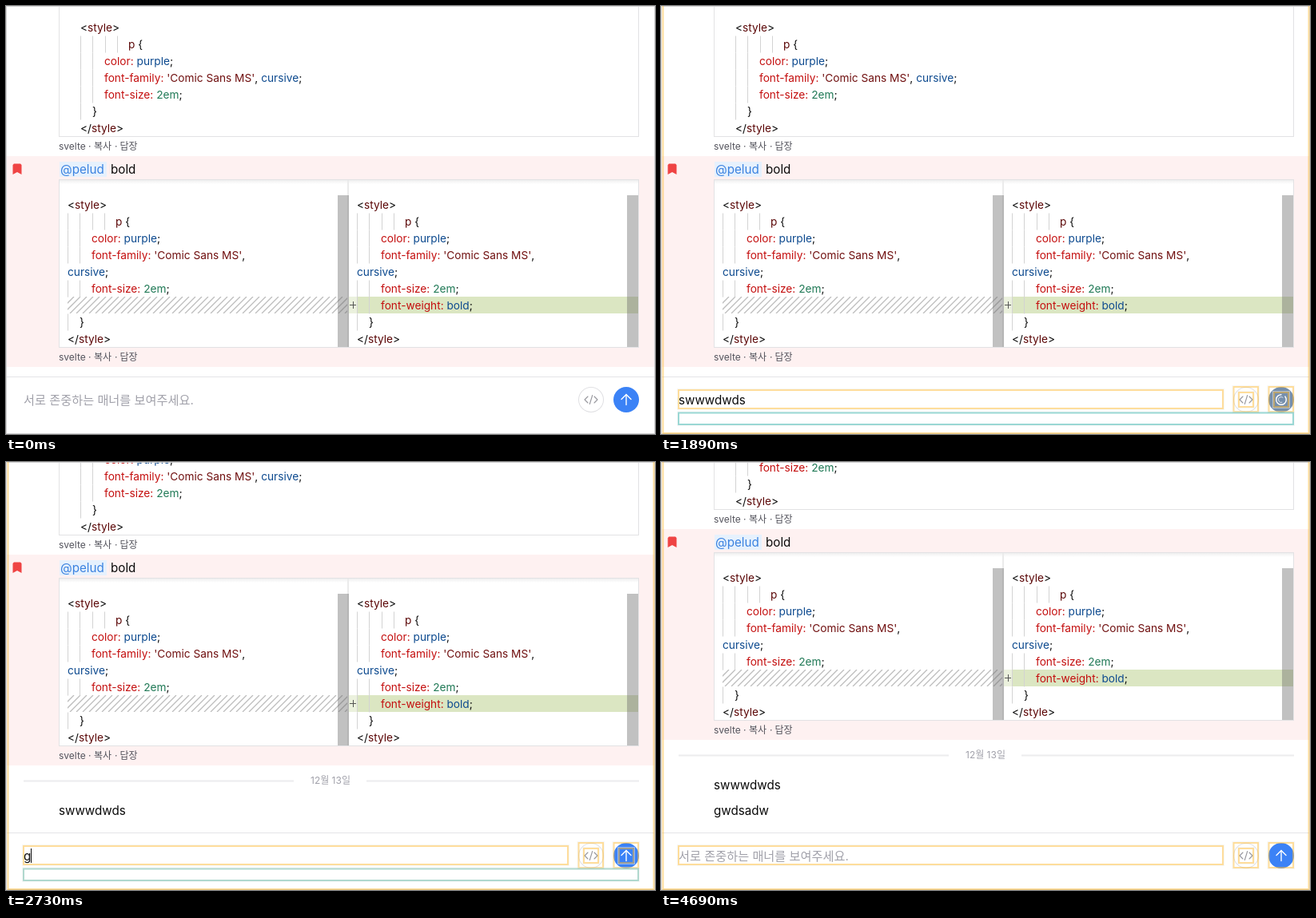
Write an HTML page with a canvas that moves like this. It is 812 by 536 pixels and loops after 4.76 s.

```html
<!DOCTYPE html>
<html lang="ko">
<head>
<meta charset="utf-8">
<title>Chat composer</title>
<style>
html, body { margin: 0; width: 100%; height: 100%; overflow: hidden; background: #fff; }
canvas { display: block; }
</style>
</head>
<body>
<canvas id="stage" width="812" height="536"></canvas>
<script>
const ctx = document.getElementById('stage').getContext('2d');
const LOOP = 4760, STEP = 70;
const FONT = "Inter, 'Noto Sans CJK KR', 'Noto Sans CJK', sans-serif";
const CODE = 13.7, BODY = 15.2, SMALL = 12;

const INK = '#0a0a0a', TAG = '#5c0808', PROP = '#c40f0f', VALUE = '#0d4a8f',
      STRING = '#701010', NUMBER = '#217a57', GUIDE = '#d3d3d3';
// outline colours, from few updates to many
const HEAT = ['#37afa9', '#63b19e', '#80b393', '#97b488', '#abb67d',
              '#beb771', '#cfb965', '#dfba57', '#efbb49', '#febc38'];

const FIRST = { text: 'swwwdwds', keys: [490, 630, 700, 770, 840, 910, 1190, 1330], send: 1820, done: 2030, posted: 2170 };
const SECOND = { text: 'gwdsadw', keys: [2520, 2800, 2940, 3080, 3150, 3220, 3360], send: 3850, done: 4060, posted: 4270 };
// the seventh letter lands between two ticks of the first burst
FIRST.keys = [490, 560, 630, 700, 840, 910, 1190, 1330];

const within = (t, a, b) => t >= a && t < b;
const typed = (msg, t) => msg.keys.filter(k => k <= t).length;
const heat = n => HEAT[Math.max(0, Math.min(9, n - 1))];

function rect(x, y, w, h, color) {
  ctx.fillStyle = color;
  ctx.fillRect(x, y, w, h);
}

function text(str, x, y, size, color) {
  ctx.font = `${size}px ${FONT}`;
  ctx.fillStyle = color;
  ctx.fillText(str, x, y);
  return x + ctx.measureText(str).width;
}

function path(points, color, width) {
  ctx.beginPath();
  points.forEach(([x, y], i) => i ? ctx.lineTo(x, y) : ctx.moveTo(x, y));
  ctx.strokeStyle = color;
  ctx.lineWidth = width;
  ctx.stroke();
}

function disc(x, y, r, fill) {
  ctx.beginPath();
  ctx.arc(x, y, r, 0, Math.PI * 2);
  ctx.fillStyle = fill;
  ctx.fill();
}

// Code lines are lists of [string, colour] runs, centred on y.
function codeLine(x, y, runs) {
  for (const [str, color] of runs) x = text(str, x, y + 5, CODE, color);
}

function guides(x, y, n) {
  for (let i = 0; i < n; i++) rect(x + Math.round(i * 15.3), y - 10.5, 1, 21, GUIDE);
}

const decl = (name, value, color) => [[name + ': ', PROP], [value, color], [';', INK]];

function codeBlock(x, y, wrapped, extra) {
  const at = (dy, dx, runs, n) => {
    if (n) guides(x, y + dy, n);
    codeLine(x + dx, y + dy, runs);
  };
  at(0, 0, [['<', INK], ['style', TAG], ['>', INK]]);
  at(21, 60, [['p', TAG], [' {', INK]], 4);
  at(42, 30, decl('color', 'purple', VALUE), 2);
  const family = [['font-family: ', PROP], ["'Comic Sans MS'", STRING], [', ', INK]];
  const cursive = [['cursive', VALUE], [';', INK]];
  let dy = 63;
  at(dy, 30, wrapped ? family : family.concat(cursive), 2);
  if (wrapped) at(dy += 21, 0, cursive);
  at(dy += 21, 30, decl('font-size', '2em', NUMBER), 2);
  if (wrapped) {
    dy += 21;
    if (extra) at(dy, 30, decl('font-weight', 'bold', VALUE), 2);
  }
  at(dy += 21, 15, [['}', INK]], 1);
  at(dy += 21, 0, [['</', INK], ['style', TAG], ['>', INK]]);
}

function footer(y) {
  const color = '#52525b';
  text('svelte', 66, y + 4, SMALL, color);
  text('·', 103, y + 4, SMALL, color);
  text('복사', 110, y + 4, SMALL, color);
  text('·', 136, y + 4, SMALL, color);
  text('답장', 142.5, y + 4, SMALL, color);
}

function frame(x, y, w, h, color) {
  ctx.strokeStyle = color;
  ctx.lineWidth = 1;
  ctx.strokeRect(x + .5, y + .5, w, h);
}

function hatch(x, y, w, h) {
  ctx.save();
  ctx.beginPath();
  ctx.rect(x, y, w, h);
  ctx.clip();
  for (let s = x - h; s < x + w; s += 8)
    path([[s, y + h], [s + h, y]], 'rgba(34,34,34,.3)', 1.3);
  ctx.restore();
}

function diff() {
  rect(66, 217, 726, 211, '#fff');
  rect(439, 364, 352, 21, '#dbe6c2');
  rect(429, 364, 10, 21, '#ebf1dd');
  hatch(77, 364, 351, 21);
  const shade = ctx.createLinearGradient(0, 217, 0, 223);
  shade.addColorStop(0, '#ececec');
  shade.addColorStop(1, '#fff');
  rect(67, 217, 724, 6, shade);
  codeBlock(77, 249, true, false);
  codeBlock(439, 249, true, true);
  path([[430, 374.5], [438, 374.5]], '#555', 1);
  path([[434.5, 370], [434.5, 379]], '#555', 1);
  rect(427, 218, 2, 209, '#ebebeb');
  rect(415, 237, 14, 190, 'rgba(100,100,100,.4)');
  rect(777, 237, 14, 190, 'rgba(100,100,100,.4)');
  frame(66, 217, 725, 210, '#e2e2e4');
}

function bookmark() {
  ctx.beginPath();
  [[8.5, 199], [10, 197.5], [18, 197.5], [19.5, 199], [19.5, 211], [14, 208], [8.5, 211]]
    .forEach(p => ctx.lineTo(...p));
  ctx.fillStyle = '#ef4444';
  ctx.fill();
}

function list(t) {
  frame(66, -20, 725, 183, '#e2e2e4');
  codeBlock(93, 27, false);
  footer(176);
  rect(1, 188, 810, 264, '#fef1f1');
  bookmark();
  rect(67, 195, 59, 19, '#e6f1fd');
  text('@pelud', 68, 210, BODY, '#3b82e0');
  text('bold', 131, 210, BODY, INK);
  diff();
  footer(440);
  if (t < FIRST.posted) return;
  rect(22, 470.5, 338, 2, '#ececee');
  rect(451, 470.5, 341, 2, '#ececee');
  text('12월 13일', 381, 475, SMALL, '#a1a1aa');
  text(FIRST.text, 66, 514, BODY, INK);
  if (t >= SECOND.posted) text(SECOND.text, 66, 546, BODY, INK);
}

function outline(x1, y1, x2, y2, color) {
  ctx.save();
  ctx.globalAlpha = .5;
  ctx.lineWidth = 1;
  ctx.strokeStyle = '#f0f0f0';
  ctx.strokeRect(x1 - 1.5, y1 - 1.5, x2 - x1 + 3, y2 - y1 + 3);
  ctx.lineWidth = 2;
  ctx.strokeStyle = color;
  ctx.strokeRect(x1, y1, x2 - x1, y2 - y1);
  ctx.restore();
}

function listOutlines() {
  const c = HEAT[0];
  outline(2.5, -140, 810.5, 187, c);
  outline(2.5, 189, 810.5, 451, c);
  outline(67, -120, 790, 162, c);
  outline(6, 196, 21, 212, c);
  outline(67, 217, 790, 426, c);
  for (const y of [164, 428]) {
    outline(66, y, 791, y + 19.5, c);
    outline(110.5, y + 4, 131, y + 19, c);
  }
}

// How far the send button has turned grey, 0 to 1.
function busyLevel(t) {
  for (const { send, done } of [FIRST, SECOND]) {
    if (within(t, send, done)) return Math.min(1, (t - send + 70) / 140);
    if (within(t, done, done + 210)) return 1 - (t - done + 70) / 280;
  }
  return 0;
}

function sendButton(t, busy) {
  const k = busyLevel(t);
  const mix = (a, b) => Math.round(a + (b - a) * k);
  disc(776, 493, 16, `rgb(${mix(59, 118)},${mix(130, 143)},${mix(246, 172)})`);
  ctx.lineCap = ctx.lineJoin = 'round';
  if (busy) {
    const a = t / 1000 * Math.PI * 2;
    ctx.beginPath();
    ctx.arc(776, 493, 6.3, a, a + 5.4);
    ctx.strokeStyle = '#fff';
    ctx.lineWidth = 1.4;
    ctx.stroke();
    ctx.beginPath();
    ctx.arc(776, 493, 3.4, a + 2, a + 6);
    ctx.lineWidth = .8;
    ctx.stroke();
  } else {
    path([[776, 499.5], [776, 486.5]], '#fff', 1.4);
    path([[770, 492.5], [776, 486.5], [782, 492.5]], '#fff', 1.4);
  }
}

function codeButton() {
  disc(732, 493, 16, '#e0e0e3');
  disc(732, 493, 15, '#fff');
  ctx.lineCap = ctx.lineJoin = 'round';
  const c = '#97979d';
  path([[728, 489], [724, 493], [728, 497]], c, 1.1);
  path([[736, 489], [740, 493], [736, 497]], c, 1.1);
  path([[733.7, 487.5], [730.3, 498.5]], c, 1.1);
}

function composer(t) {
  rect(0, 464, 812, 72, '#fff');
  rect(0, 464, 812, 1, '#e4e4e7');
  const msg = [FIRST, SECOND].find(m => within(t, m.keys[0], m.done));
  const busy = [FIRST, SECOND].some(m => within(t, m.send, m.done));
  let end = 22;
  if (msg) end = text(msg.text.slice(0, typed(msg, t)), 22, 498.5, BODY, INK);
  else text('서로 존중하는 매너를 보여주세요.', 22, 498.5, BODY, '#a1a1aa');
  if (within(t, 70, SECOND.done) && !busy) rect(Math.round(end), 484, 1, 18, INK);
  codeButton();
  sendButton(t, busy);
  ctx.lineCap = 'butt';
  ctx.lineJoin = 'miter';
}

function stripColor(t) {
  if (t < 1050) return HEAT[0];
  if (t < FIRST.send) return HEAT[2];
  if (t < SECOND.keys[0]) return HEAT[0];
  return t < SECOND.send ? heat(typed(SECOND, t) + 1) : HEAT[9];
}

function composerOutlines(t) {
  if (!within(t, 70, 280) && t < 560) return;
  const c = t > FIRST.send ? HEAT[9] : heat(typed(FIRST, t - STEP));
  outline(2.5, -4, 810.5, 535, c);
  outline(22, 481, 703, 504, c);
  outline(716.5, 477, 747, 508, c);
  outline(723, 484, 741, 502, c);
  outline(760.5, 477, 791, 508, c);
  if (t < 4480) outline(767, 484, 785, 502, c);
  if (t < 4550) outline(22, 509.5, 791, 524, stripColor(t));
}

function draw(now) {
  const t = Math.floor(now % LOOP / STEP) * STEP;
  const scroll = t >= SECOND.posted ? 104 : t >= FIRST.posted ? 72 : 0;
  rect(0, 0, 812, 536, '#fff');
  ctx.save();
  ctx.translate(0, -scroll);
  list(t);
  ctx.restore();
  composer(t);
  frame(0, 0, 811, 535, '#d2d2d4');
  composerOutlines(t);
  if (within(t, 2100, 2310) || within(t, 4200, 4480)) {
    ctx.save();
    ctx.beginPath();
    ctx.rect(0, 0, 812, 464);
    ctx.clip();
    ctx.translate(0, -scroll);
    listOutlines();
    ctx.restore();
  }
}

const start = performance.now();
function tick() {
  draw(performance.now() - start);
  requestAnimationFrame(tick);
}
tick();
</script>
</body>
</html>
```
